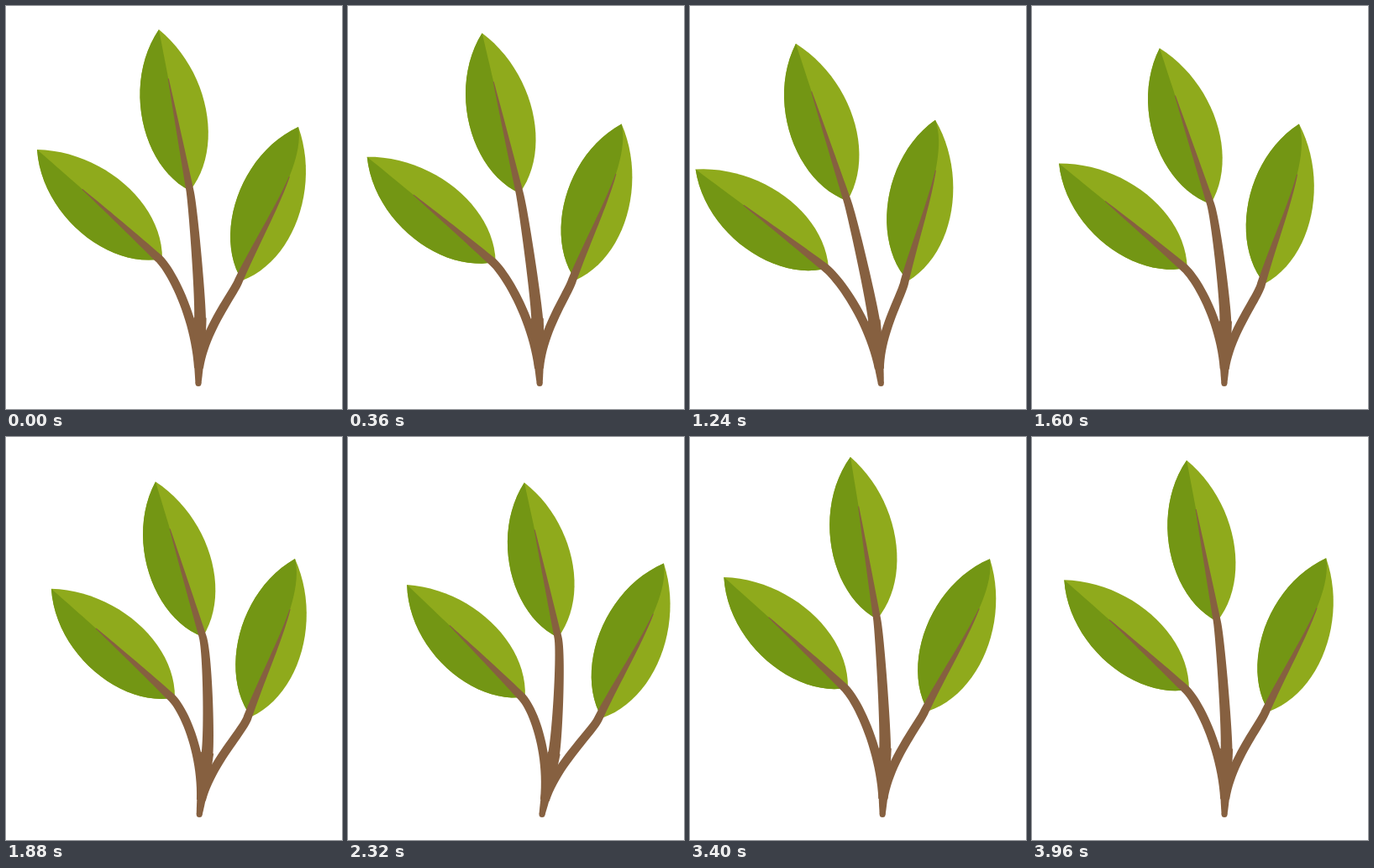
Recreate the animation shown at these times as an HTML page with a canvas. Size 400 by 480 pixels, loop 4 s.

```html
<!DOCTYPE html>
<html lang="en">
<head>
<meta charset="utf-8">
<title>Swaying sprig</title>
<style>
  html, body { margin: 0; width: 100%; height: 100%; overflow: hidden; background: #fff; }
  canvas { display: block; width: 400px; height: 480px; }
</style>
</head>
<body>
<canvas id="stage" width="400" height="480"></canvas>
<script>
const ctx = document.getElementById('stage').getContext('2d');
const LOOP = 4000, STEP = 40;
const DARK = '#739614', LIGHT = '#8faa1c', BROWN = '#866040';

// The whole sway in a few poses: the stems lean, the tips flex, the leaves droop (px).
const POSES = [
  { at: 0, lean: 0, flex: 0, droop: 0 },
  { at: 760, lean: -20, flex: -45, droop: 7 },
  { at: 1240, lean: -21, flex: -56, droop: 12 },
  { at: 1880, lean: 15, flex: -4, droop: 18 },
  { at: 2400, lean: 25, flex: 30, droop: 18 },
  { at: 2840, lean: 17, flex: 15, droop: 8 },
  { at: 3140, lean: -3, flex: 0, droop: -2 },
  { at: 3400, lean: 2, flex: 9, droop: -3 },
  { at: 3620, lean: 7, flex: 17, droop: -2 }
];

// A joint rests at x, y and follows [lean, flex, droop] by the given gains.
const joint = (x, y, gainX, gainY) => ({ x, y, gainX, gainY });
const FORK = joint(231, 375, [.55, 0, 0], [0, 0, .25]);
const ROOT = joint(229, 449.5, [.08, 0, 0], [0, 0, 0]);

// bend: where the stem meets the trunk, sideways px and share of the trunk; join: how far down it ends.
const LEAVES = [
  { // left
    tip: joint(37, 171, [1, .2, .15], [-.55, 0, 1]),
    base: joint(186, 301, [1, 0, 0], [-.15, 0, .65]),
    bow: 0, veinStart: .44, reach: .1, offset: [-5, -1], bend: [-6, .08], join: .75, widths: [1, 10, 11]
  },
  { // middle
    tip: joint(182, 28, [0, 1, 0], [0, 0, 1.4]),
    base: joint(219, 220, [1.06, .17, 0], [0, 0, 1]),
    bow: 0, veinStart: .38, reach: .1, offset: [0, 0], bend: [0, .35], join: 0, widths: [1, 9, 14]
  },
  { // right
    tip: joint(348, 144, [0, 1, 0], [0, .17, .1]),
    base: joint(281, 327, [.75, .1, 0], [.12, 0, .25]),
    bow: .115, veinStart: .38, reach: .08, offset: [-4, 0], bend: [6, -.13], join: .75, widths: [1, 10, 11]
  }
];

const mix = (a, b, k) => a + (b - a) * k;
const add = (p, q, k = 1) => [p[0] + q[0] * k, p[1] + q[1] * k];
const sub = (p, q) => add(p, q, -1);
const lerp = (p, q, k) => [mix(p[0], q[0], k), mix(p[1], q[1], k)];

// Smooth periodic curve through the poses, one value per sway signal.
function swayAt(time) {
  const n = POSES.length;
  const pose = i => POSES[(i + n) % n];
  const at = i => pose(i).at + LOOP * Math.floor(i / n);
  let i = n - 1;
  while (POSES[i].at > time) i--;
  const h = at(i + 1) - at(i), s = (time - at(i)) / h;
  return ['lean', 'flex', 'droop'].map(key => {
    const value = j => pose(j)[key];
    const slope = j => {
      const h1 = at(j) - at(j - 1), h2 = at(j + 1) - at(j);
      const d1 = (value(j) - value(j - 1)) / h1, d2 = (value(j + 1) - value(j)) / h2;
      return (d1 * h2 + d2 * h1) / (h1 + h2);
    };
    return mix(value(i), value(i + 1), s * s * (3 - 2 * s))
      + h * s * (1 - s) * (slope(i) * (1 - s) - slope(i + 1) * s);
  });
}

function place(point, sway) {
  const follow = gains => gains.reduce((sum, gain, i) => sum + gain * sway[i], 0);
  return [point.x + follow(point.gainX), point.y + follow(point.gainY)];
}

function cubic([a, b, c, d], t) {
  const u = 1 - t;
  return [0, 1].map(k =>
    u * u * u * a[k] + 3 * u * u * t * b[k] + 3 * u * t * t * c[k] + t * t * t * d[k]);
}

function sample(curve, from, to, count = 24) {
  return Array.from({ length: count + 1 }, (_, i) => cubic(curve, mix(from, to, i / count)));
}

function fillPolygon(points, color) {
  ctx.beginPath();
  points.forEach(p => ctx.lineTo(p[0], p[1]));
  ctx.closePath();
  ctx.fillStyle = color;
  ctx.fill();
}

// Tapered band around a centre line; widthAt takes the share of the points passed.
function ribbon(points, widthAt) {
  const left = [], right = [], last = points.length - 1;
  points.forEach((p, i) => {
    const d = sub(points[Math.min(i + 1, last)], points[Math.max(i - 1, 0)]);
    const k = widthAt(i / last) / 2 / Math.hypot(...d);
    left.push(add(p, [d[1], -d[0]], k));
    right.unshift(add(p, [d[1], -d[0]], -k));
  });
  fillPolygon(left.concat(right), BROWN);
}

function drawBranch(leaf, fork, root, sway) {
  const tip = place(leaf.tip, sway), base = place(leaf.base, sway);
  const neck = add(base, leaf.offset);
  const axis = sub(base, tip), trunk = sub(fork, root);
  const local = (s, n) => add(add(tip, axis, s), [axis[1], -axis[0]], n);

  const light = sample([tip, local(.3, .25), local(.78, .255), base], 0, 1);
  const dark = sample([tip, local(.28, -.28), local(.8, -.26), base], 0, 1);
  const rib = [tip, local(.2, leaf.bow), local(.6, leaf.bow * .13), neck];
  fillPolygon(light.concat([...dark].reverse()), LIGHT);
  fillPolygon(dark.concat(sample(rib, 1, 0)), DARK);

  const [side, along] = leaf.bend;
  const stem = [
    neck,
    add(neck, axis, leaf.reach),
    add(add(fork, trunk, along), [side, 0]),
    lerp(fork, root, leaf.join)
  ];
  const [thin, mid, thick] = leaf.widths;
  const line = sample(rib, leaf.veinStart, 1).concat(sample(stem, 0, 1).slice(1));
  ribbon(line, k => k < .5 ? mix(thin, mid, k * 2) : mix(mid, thick, k * 2 - 1));
}

function drawTrunk(fork, root) {
  const line = Array.from({ length: 13 }, (_, i) => lerp(fork, root, mix(-.05, 1, i / 12)));
  ribbon(line, k => mix(15, 7, k ** 2));
  ctx.beginPath();
  ctx.arc(root[0], root[1], 3.5, 0, Math.PI * 2);
  ctx.fill();
}

function draw(time) {
  ctx.fillStyle = '#fff';
  ctx.fillRect(0, 0, 400, 480);
  const sway = swayAt(time);
  const fork = place(FORK, sway), root = place(ROOT, sway);
  LEAVES.forEach(leaf => drawBranch(leaf, fork, root, sway));
  drawTrunk(fork, root);
}

const start = performance.now();
function tick() {
  const elapsed = (performance.now() - start) % LOOP;
  draw(Math.floor(elapsed / STEP) * STEP);
  requestAnimationFrame(tick);
}
tick();
</script>
</body>
</html>
```
